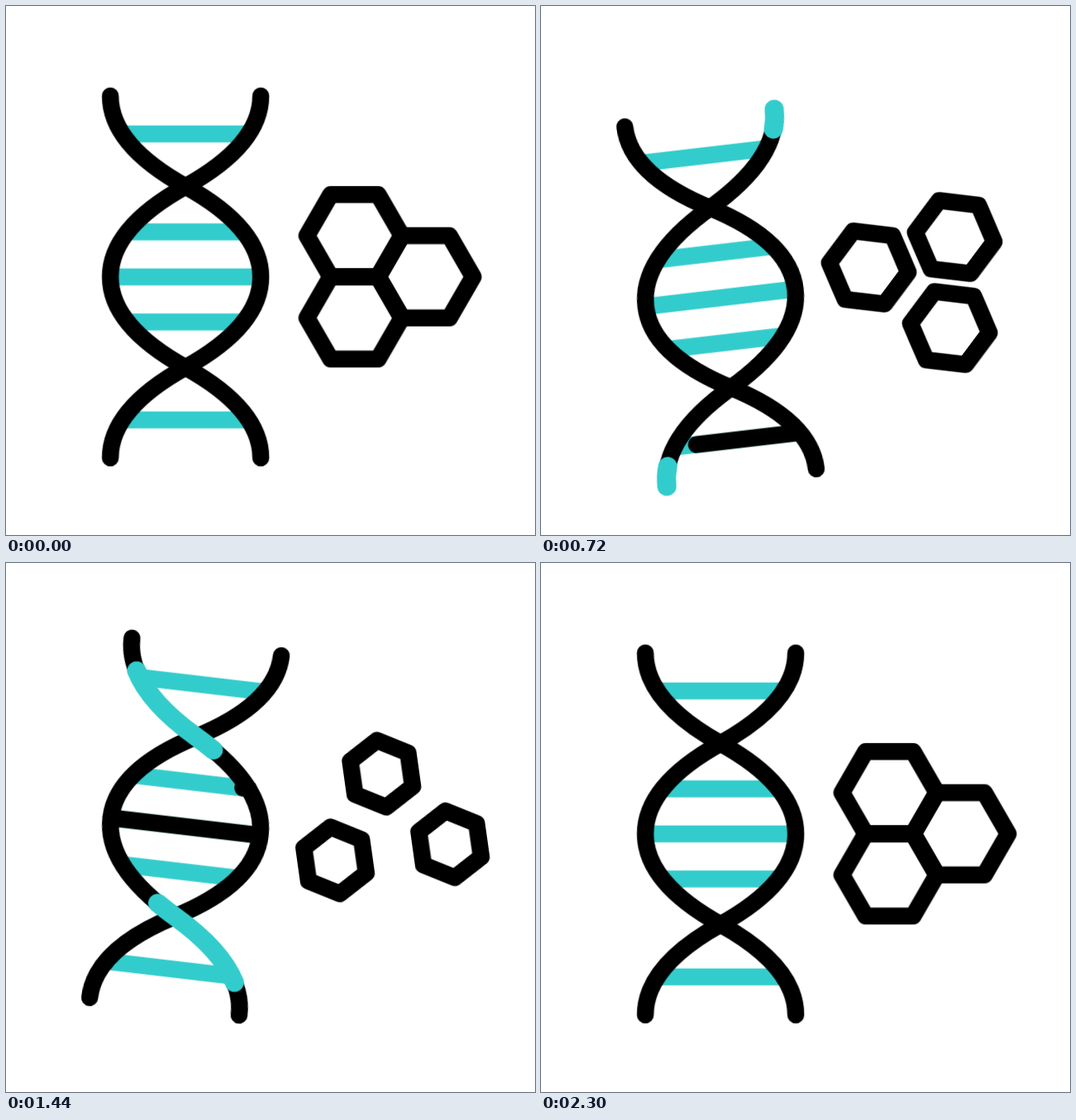
Animation of 640 by 640 pixels, one loop 2.4 s. Source, as an HTML page:

```html
<!DOCTYPE html>
<html lang="en">
<head>
<meta charset="utf-8">
<title>DNA and molecule</title>
<style>
  @property --head { syntax: "<length>"; inherits: false; initial-value: 0px; }
  @property --tail { syntax: "<length>"; inherits: false; initial-value: 0px; }

  html, body { margin: 0; width: 100%; height: 100%; overflow: hidden; background: #fff; }
  svg { display: block; width: 100vw; height: 100vh; }

  svg * {
    fill: none;
    stroke-width: 20.5;
    animation: 2400ms cubic-bezier(.3333, 0, .6667, 1) infinite both;
  }

  .bars { stroke: #3cc; }
  .dashes, .strands, .cells { stroke: #000; stroke-linecap: round; stroke-linejoin: round; }

  .bob { animation-name: bob; }
  .sway { animation-name: sway; }
  .spin { animation-name: spin; }

  .dashes path {
    stroke-dasharray: 1 2;
    animation-name: pass;
    animation-delay: calc(500ms + 300ms * var(--i));
  }

  .strands path {
    d: path("M91-219C91-171 46-135 0-109.5S-91-48-91 0S-46 84 0 109.5S91 171 91 219");
  }
  .strands .glow {
    stroke: #3cc;
    stroke-width: 23;
    stroke-dasharray: calc(var(--head) - var(--tail)) 300px;
    stroke-dashoffset: calc(-1 * var(--tail));
    animation-name: head, tail, show;
    animation-timing-function: cubic-bezier(.3333, 0, .6667, 1), cubic-bezier(.3333, 0, .6667, 1), step-end;
  }

  .cells path {
    d: path("M57.45 0L28.72 49.75H-28.72L-57.45 0L-28.72-49.75H28.72Z");
    vector-effect: non-scaling-stroke;
    animation-name: spread;
  }

  @keyframes bob {
    0%, 8.3333% { transform: translateY(0); }
    29.1667% { transform: translateY(25.6px); }
    50% { transform: translateY(-25.6px); }
    70.8333% { transform: translateY(10px); }
    91.6667%, 100% { transform: translateY(0); }
  }
  @keyframes sway {
    0%, 8.3333% { transform: rotate(0deg); }
    33.3333% { transform: rotate(-7deg); }
    58.3333% { transform: rotate(7deg); }
    75% { transform: rotate(-3deg); }
    91.6667%, 100% { transform: rotate(0deg); }
  }
  @keyframes pass {
    0% { stroke-dashoffset: 1; }
    12.5% { stroke-dashoffset: 0; }
    25%, 100% { stroke-dashoffset: -1; }
  }
  @keyframes head {
    0%, 25% { --head: 0px; }
    66.6667%, 100% { --head: 100px; }
  }
  @keyframes tail {
    0%, 33.3333% { --tail: 0px; }
    75%, 100% { --tail: 100px; }
  }
  @keyframes show {
    0% { opacity: 0; }
    25.2% { opacity: 1; }
    75%, 100% { opacity: 0; }
  }
  @keyframes spin {
    0%, 16.6667% { transform: rotate(0deg); }
    43.3333%, 54.6% { transform: rotate(-106deg); }
    86.9%, 100% { transform: rotate(0deg); }
  }
  @keyframes spread {
    0%, 16.6667% { transform: translate(var(--x), var(--y)) scale(1); }
    41.6667%, 58.3333% { transform: translate(var(--x2), var(--y2)) scale(.705); }
    83.3333%, 100% { transform: translate(var(--x), var(--y)) scale(1); }
  }
</style>
</head>
<body>
<svg viewBox="0 0 640 640">
  <g transform="translate(217.2 327.7)">
    <g class="bob"><g class="sway">
      <g class="bars">
        <path d="M75.5-173H-75.5M70.5-54.6H-70.5M91 0H-91M70.5 54.6H-70.5M75.5 173H-75.5"/>
      </g>
      <!-- black dashes cross the bars right to left, bottom bar first -->
      <g class="dashes">
        <path pathLength="1" style="--i:0" d="M75.5 173H-75.5"/>
        <path pathLength="1" style="--i:1" d="M70.5 54.6H-70.5"/>
        <path pathLength="1" style="--i:2" d="M91 0H-91"/>
        <path pathLength="1" style="--i:3" d="M70.5-54.6H-70.5"/>
        <path pathLength="1" style="--i:4" d="M75.5-173H-75.5"/>
      </g>
      <g class="strands">
        <path/>
        <path transform="rotate(180)"/>
        <path class="glow" pathLength="100"/>
        <path class="glow" pathLength="100" transform="rotate(180)"/>
      </g>
    </g></g>
  </g>
  <g transform="translate(464.6 327.6)">
    <g class="cells spin">
      <path style="--x:-43.1px;--y:-49.75px;--x2:-22.4px;--y2:-70.5px"/>
      <path style="--x:-43.1px;--y:49.75px;--x2:-22.4px;--y2:70.5px"/>
      <path style="--x:43.1px;--y:0px;--x2:73.8px;--y2:0px"/>
    </g>
  </g>
</svg>
</body>
</html>
```
